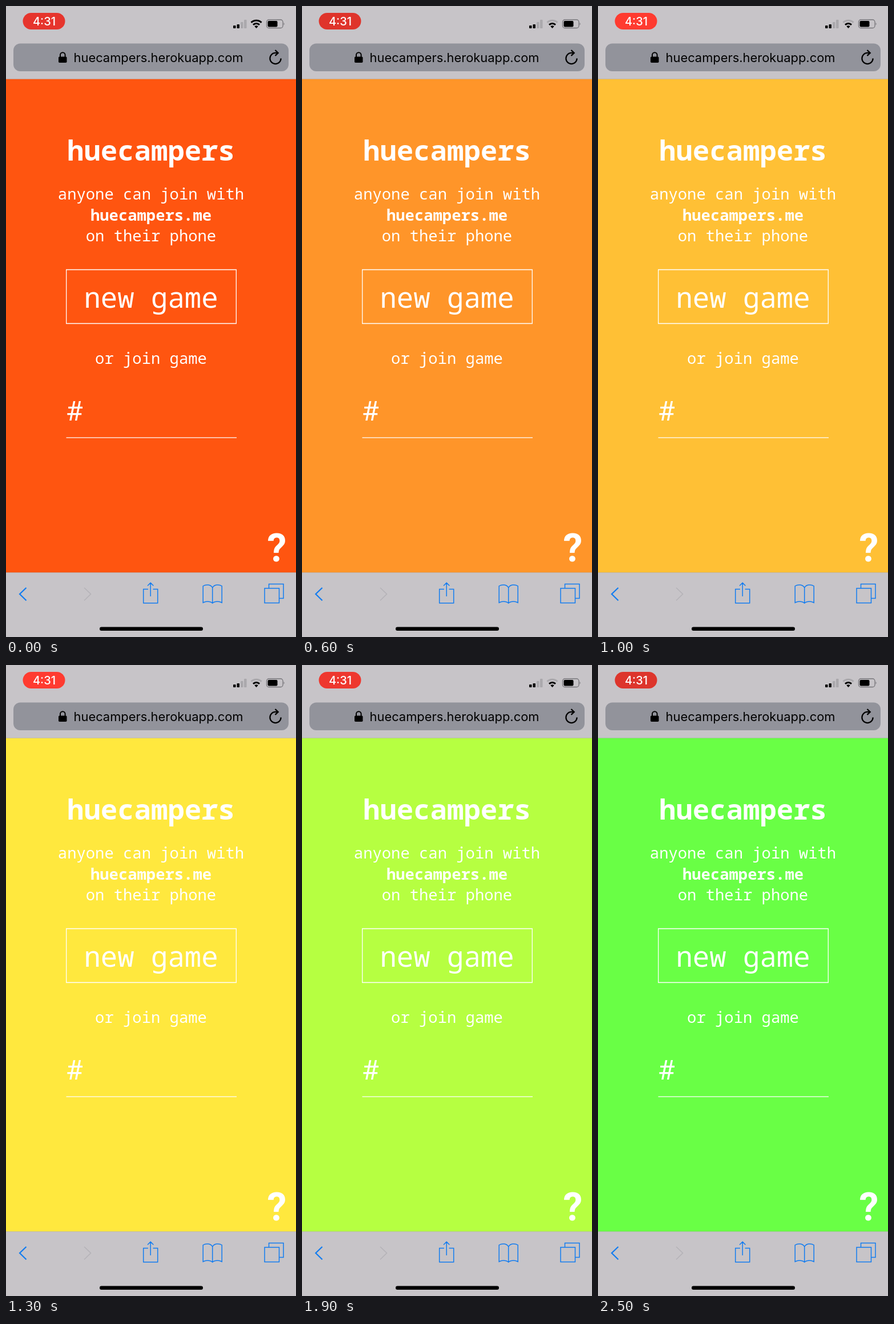
These frames come from a looping animation (508 px wide and 1102 px high, 2600 ms). An HTML page:

```html
<!DOCTYPE html>
<html lang="en">
<head>
<meta charset="utf-8">
<title>huecampers</title>
<style>
  html, body { margin: 0; width: 100%; height: 100%; overflow: hidden; background: #c7c4c8; }
  svg { display: block; width: 508px; height: 1102px; }

  .page { animation: hue 2600ms infinite; }
  .pill { animation: pulse 2600ms infinite; }
  .wifi-outer { animation: signal 2600ms step-end infinite; }

  /* the screen refreshes every 100 ms, so each stretch moves in steps */
  @keyframes hue {
    0%     { fill: #ff5510; animation-timing-function: steps(6); }
    23.07% { fill: #ff9529; animation-timing-function: steps(4); }
    38.46% { fill: #ffc035; animation-timing-function: steps(3); }
    50%    { fill: #ffe83e; animation-timing-function: step-end; }
    53.84% { fill: #fff63e; animation-timing-function: step-end; }
    57.69% { fill: #f7ff3e; animation-timing-function: step-end; }
    61.53% { fill: #eaff3f; animation-timing-function: steps(5); }
    80.76% { fill: #94ff43; animation-timing-function: steps(4); }
    96.15%, 100% { fill: #69ff45; animation-timing-function: step-end; }
  }
  @keyframes pulse {
    0%     { fill: #e6352d; animation-timing-function: steps(6); }
    23.07% { fill: #df342b; animation-timing-function: steps(4); }
    38.46% { fill: #ff3b30; animation-timing-function: step-end; }
    61.53% { fill: #ff3b30; animation-timing-function: steps(5); }
    80.76% { fill: #e2352c; animation-timing-function: steps(4); }
    96.15%, 100% { fill: #dd352c; animation-timing-function: step-end; }
  }
  @keyframes signal {
    0%     { stroke: #000; }
    11.53%, 100% { stroke: #aaa8ac; }
  }

  .ui { font-family: Inter, sans-serif; }
  .mono { font-family: "Noto Sans Mono", monospace; fill: #fff; text-anchor: middle; }
  .symbol { font-family: Roboto, sans-serif; }
  .small { font-size: 27.2px; }
  .large { font-size: 49px; }
  .semi { font-weight: 600; }
  .bold { font-weight: 700; }
  .line { fill: none; stroke: #fff; stroke-width: 1.3; }
  .edge { stroke: #b4b2b6; stroke-opacity: .75; }
  .tool { fill: none; stroke: #127cf0; stroke-width: 1.5; }
  .chevron { stroke-width: 2.2; }
  .off { stroke: #b4b2b7; }
  .ink { fill: none; stroke: #000; }
</style>
</head>
<body>
<svg viewBox="0 0 508 1102">
  <rect width="508" height="1102" fill="#c7c4c8"/>
  <rect class="page" y="127" width="508" height="863"/>
  <path class="edge" d="M0 127.5H508M0 989.5H508"/>

  <!-- status bar -->
  <g class="ui">
    <rect class="pill" x="29.5" y="12" width="74" height="29" rx="14.5"/>
    <text x="67" y="33.5" font-size="20" font-weight="500" fill="#fff" text-anchor="middle">4:31</text>
  </g>
  <g>
    <rect x="398" y="34" width="4.5" height="5" rx="1"/>
    <rect x="404.5" y="32" width="4.5" height="7" rx="1"/>
    <g fill="#aaa8ac">
      <rect x="411" y="28" width="4.5" height="11" rx="1"/>
      <rect x="417" y="24" width="4.5" height="15" rx="1"/>
    </g>
    <path class="ink wifi-outer" d="M429.5 28.8a13 13 0 0 1 18 0" stroke-width="3"/>
    <path class="ink" d="M433 32.8a8 8 0 0 1 11 0" stroke-width="3"/>
    <path d="M438.5 39l-3.2-3.4a4.6 4.6 0 0 1 6.4 0z"/>
    <rect x="456.5" y="24" width="28.5" height="14.5" rx="4" fill="none" stroke="#77757a" stroke-width="1.3"/>
    <rect x="458.5" y="26" width="17" height="10.5" rx="2"/>
    <path d="M486.5 28.8q2.2 2.4 0 5z" fill="#77757a"/>
  </g>

  <!-- address bar -->
  <rect x="13" y="65.5" width="482" height="48.5" rx="12" fill="#92939b"/>
  <rect x="92" y="88.5" width="14.5" height="10.5" rx="1.8"/>
  <path class="ink" d="M95 89V85.5a4.3 4.3 0 0 1 8.6 0V89" stroke-width="2"/>
  <text class="ui" x="118.5" y="98" font-size="21.9">huecampers.herokuapp.com</text>
  <path class="ink" d="M481.6 91.5a9.6 9.6 0 1 1-9.6-9.6h4" stroke-width="2.3"/>
  <path class="ink" d="M471.5 77l5.2 4.9-5.2 5" stroke-width="2.3"/>

  <!-- page -->
  <g class="mono">
    <text class="large semi" x="254" y="269.5">huecampers</text>
    <g class="small">
      <text x="254" y="338">anyone can join with</text>
      <text class="semi" x="254" y="374.5">huecampers.me</text>
      <text x="254" y="411">on their phone</text>
      <text x="254" y="624.5">or join game</text>
    </g>
    <text class="large" x="254" y="527">new game</text>
    <text class="large symbol" x="119.5" y="724">#</text>
    <text class="symbol bold" x="474.5" y="970" font-size="68">?</text>
  </g>
  <path class="line" d="M105.7 460.5H403.3V554.5H105.7ZM105.5 753.9H404"/>

  <!-- toolbar -->
  <g class="tool">
    <path class="chevron" d="M35.5 1016L24 1027l11.5 11.2"/>
    <path class="off" d="M137 1016l11.5 11-11.5 11.2"/>
    <path d="M249 1018.5H240.7V1042.7H265.7V1018.5H257.500M253.2 1031V1007.500M248 1012.500l5.200-5.200 5.200 5.200"/>
    <path d="M361.700 1016c-2-4-6-5-9-5-3 0-6 1-7.500 2V1042c2-1 4-2 7.500-2 4 0 7 1 9 3 2-2 5-3 9-3 3.500 0 5.500 1 7.500 2V1013c-1.500-1-4.500-2-7.500-2-3 0-7 1-9 5V1043"/>
    <path d="M453 1017H478.500V1042.500H453ZM460.500 1017V1009.500H486V1034.500H478.500"/>
  </g>
  <rect x="164" y="1084.5" width="181" height="6.5" rx="3.2"/>
</svg>
</body>
</html>
```
